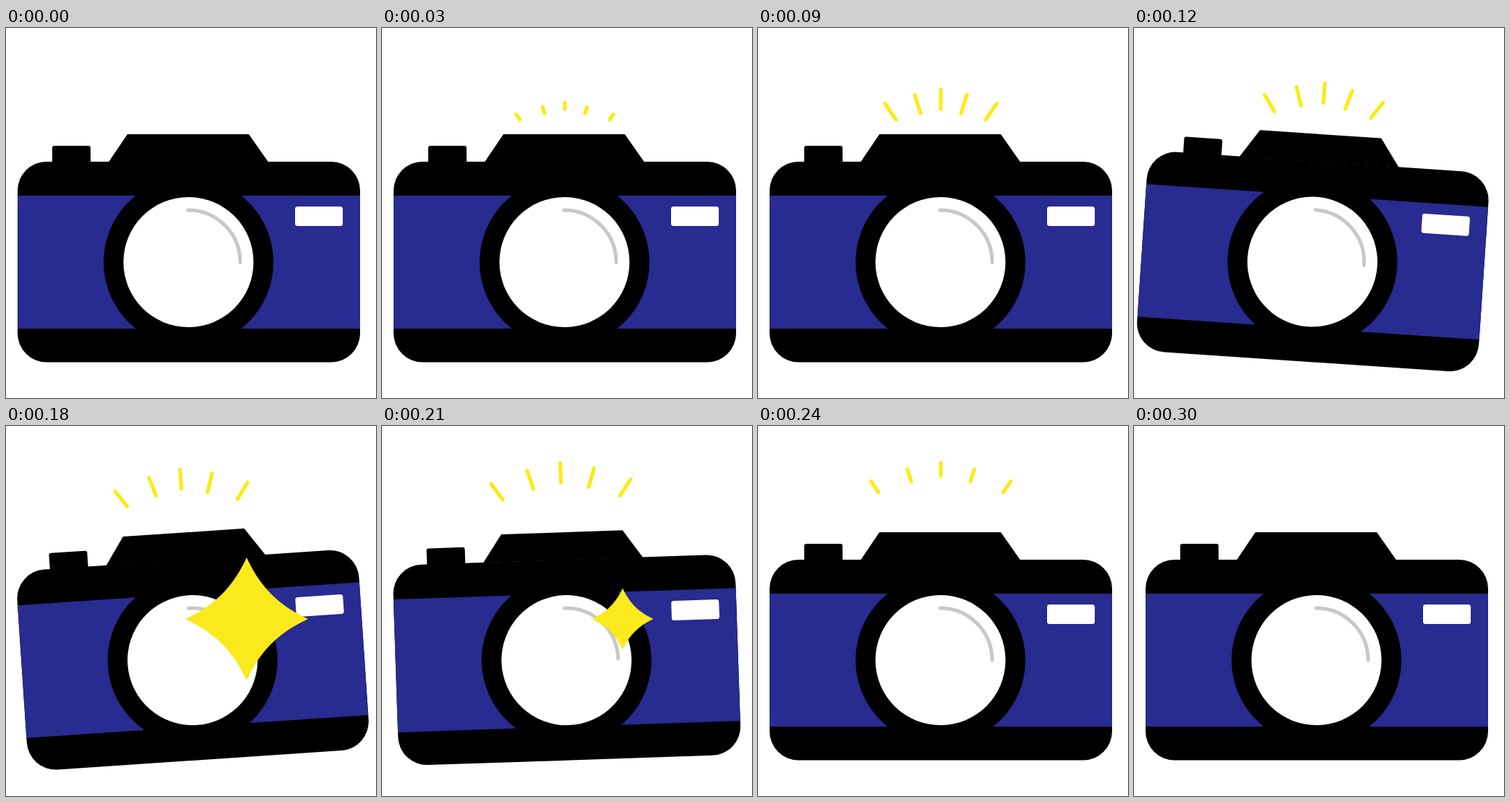
Write an HTML page that moves like this. It is 512x512 px and loops after 330 ms.

```html
<!DOCTYPE html>
<html lang="en">
<head>
<meta charset="utf-8">
<title>Camera flash</title>
<style>
  html, body { margin: 0; width: 100%; height: 100%; overflow: hidden; background: #fff; }
  svg { display: block; width: 100vw; height: 100vh; }
</style>
</head>
<body>
<svg viewBox="0 0 512 512">
  <g id="camera">
    <rect x="16" y="185" width="474" height="277.5" rx="40"/>
    <rect x="64" y="163" width="53" height="26" rx="3"/>
    <path d="M142 185.500L168 147H336L363 185.500Z"/>
    <rect x="16" y="232" width="474" height="184" fill="#282b8f"/>
    <circle cx="252.500" cy="324" r="117.500"/>
    <circle cx="252.500" cy="324" r="90" fill="#fff"/>
    <path d="M252 252A72 72 0 0 1 324 324" fill="none" stroke="#c8c8c8" stroke-width="5" stroke-linecap="round"/>
    <rect x="400" y="247" width="66" height="27" rx="3.500" fill="#fff"/>
    <g id="rays" stroke="#fdea14" stroke-width="5" stroke-linecap="round">
      <path transform="translate(191 127) rotate(-34.500)"/>
      <path transform="translate(225 118) rotate(-17.500)"/>
      <path transform="translate(253 112)"/>
      <path transform="translate(281 118) rotate(17.500)"/>
      <path transform="translate(315 127) rotate(34.500)"/>
    </g>
  </g>
  <path id="star" fill="#fae91c" d="M0-85C19-44 44-19 85 0C44 19 19 44 0 85C-19 44-44 19-85 0C-44-19-19-44 0-85Z"/>
</svg>
<script>
const STEP_MS = 30, STEPS = 11;
const tilt = [0, 0, 0, 0, 1, 0, -1, -0.5, 0, 0, 0];
const camera = document.getElementById('camera');
const star = document.getElementById('star');
const rays = document.querySelectorAll('#rays path');
const clamp = (v, max) => Math.max(0, Math.min(max, v));

function draw(step) {
  camera.setAttribute('transform', `rotate(${3.85 * tilt[step]} 256 240)`);

  // Rays grow, fly outwards, then shrink towards their tips.
  const flight = 8.5 * clamp(step - 3, 4);
  const tip = flight + 9 * clamp(step, 3);
  const tail = flight + 9 * clamp(step - 7, 3);
  rays.forEach(ray => ray.setAttribute('d', tip > tail ? `M0 ${-tail}V${-tip}` : ''));

  const size = Math.max(0, 1 - Math.abs(step - 6) / 2);
  star.setAttribute('transform', `translate(333 267) scale(${size})`);
}

function tick() {
  draw(Math.floor(performance.now() / STEP_MS) % STEPS);
  requestAnimationFrame(tick);
}
tick();
</script>
</body>
</html>
```
